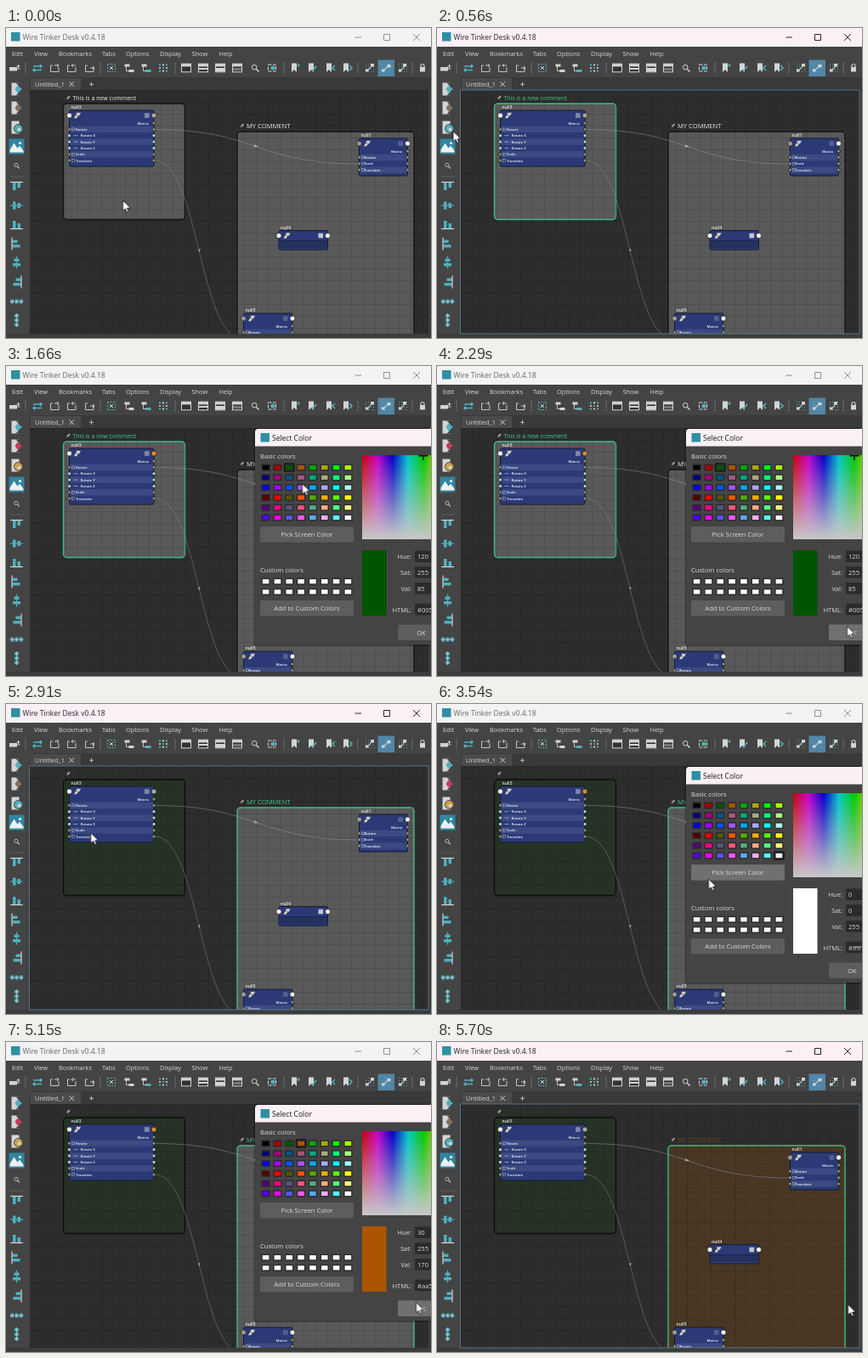
An HTML page for the animation above (6010 ms loop, 500 px wide and 365 px high).

```html
<!DOCTYPE html>
<html lang="en">
<head>
<meta charset="utf-8">
<title>Node editor</title>
<style>
html, body { margin: 0; width: 100%; height: 100%; overflow: hidden; background: #383838; }
svg { display: block; width: 500px; height: 365px; }
text { font: 7.4px "Open Sans", "Noto Sans", sans-serif; fill: #d8d8d8; white-space: pre; }
.cap { font-size: 8.5px; }
.dlg text { font-size: 7.6px; fill: #dcdcdc; }
.dlg .cap { font-size: 8.5px; fill: #1a1a1a; }
.node text { font-size: 4.3px; font-weight: 600; fill: #f0f2fa; }
.node .name { font-size: 5px; fill: #ececec; }

/* Loop: 6010 ms */
.dlg, .green, .orange, .plain, .okHover, .pickHover, .cap.win, .bar, .ctl, .c1, .c2, .t1, .t2, .warm, .red, .gold, .focus {
  animation: 6010ms step-end infinite;
}
.cap.win { animation-name: caption; }
.bar { animation-name: bar; }
.ctl { animation-name: controls; }
.dlg, .focus { visibility: hidden; }
.dlg { animation-name: dlg; }
.focus { animation-name: focus; }
.plain { animation-name: plain; }
.green { animation-name: green; }
.orange { animation-name: orange; }
.okHover { animation-name: okHover; }
.pickHover { animation-name: pickHover; }
.c1 { animation-name: c1; }
.c2 { animation-name: c2; }
.t1 { animation-name: t1; }
.t2 { animation-name: t2; }
.warm { --hot: #e08a28; animation-name: warm; }
.red { --hot: #c93a5a; --cold: #85705f; animation-name: warm; }
.gold { --hot: #cfa04c; --cold: #4fb0c0; animation-name: warm; }
.cursor { animation: move 6010ms linear infinite; }

@keyframes dlg { 0%, 39.43%, 90.52% { visibility: hidden } 15.14%, 55.57% { visibility: visible } }
@keyframes focus { 0%, 15.14%, 55.57% { visibility: hidden } 2.33%, 39.43%, 90.52% { visibility: visible } }
@keyframes plain { 0%, 39.43%, 90.52% { visibility: hidden } 15.14%, 55.57% { visibility: visible } 24.13%, 77.54% { visibility: hidden } }
@keyframes green { 0%, 39.43% { visibility: hidden } 24.13% { visibility: visible } }
@keyframes orange { 0%, 90.52% { visibility: hidden } 77.54% { visibility: visible } }
@keyframes okHover { 0%, 39.43%, 90.52% { visibility: hidden } 34.6%, 83.5% { visibility: visible } }
@keyframes pickHover { 0%, 63.4% { visibility: hidden } 57.8% { visibility: visible } }
@keyframes caption { 0%, 15.14%, 55.57% { fill: #666 } 2.33%, 39.43%, 90.52% { fill: #222 } }
@keyframes bar { 0%, 15.14%, 55.57% { fill: #f3f3f3 } 2.33%, 39.43%, 90.52% { fill: #fcf0f7 } }
@keyframes controls { 0%, 15.14%, 55.57% { stroke: #858585 } 2.33%, 39.43%, 90.52% { stroke: #111 } }
@keyframes c1 {
  0% { fill: #595959; stroke: #141414 } 2.33% { fill: #595959; stroke: #3dbd87 }
  39.43% { fill: #263324; stroke: #3dbd87 } 42.6% { fill: #263324; stroke: #0c100c }
}
@keyframes c2 {
  0% { fill: #595959; stroke: #141414 } 42.6% { fill: #595959; stroke: #3dbd87 }
  90.52% { fill: #493723; stroke: #3dbd87 }
}
@keyframes t1 { 0% { fill: #f0f0f0 } 2.33% { fill: #3fcb8e } 39.43% { fill: #1d401d } }
@keyframes t2 { 0% { fill: #f0f0f0 } 42.6% { fill: #3fcb8e } 90.52% { fill: #6e481c } }
@keyframes warm { 0%, 39.43%, 90.52% { fill: var(--cold, #a8a8a8) } 15.14%, 55.57% { fill: var(--hot) } }
@keyframes move {
  0%, 2.33% { transform: translate(137.5px, 203px); animation-timing-function: ease-in-out }
  10.5%, 15.14% { transform: translate(14px, 118px); animation-timing-function: ease-out }
  17.3% { transform: translate(306.5px, 135px); animation-timing-function: ease-in-out }
  22.5%, 25.3% { transform: translate(333px, 119px); animation-timing-function: ease-in-out }
  35.7%, 39.43% { transform: translate(482.5px, 306.5px); animation-timing-function: ease-in-out }
  41.9%, 43.3% { transform: translate(440px, 285px); animation-timing-function: ease-in-out }
  50.75%, 55.57% { transform: translate(14px, 118px); animation-timing-function: ease-out }
  58.9%, 62.2% { transform: translate(319.5px, 206px); animation-timing-function: ease-in-out }
  72.88% { transform: translate(360.5px, 119px); animation-timing-function: ease-in-out }
  76%, 77.54% { transform: translate(347px, 119px); animation-timing-function: ease-in-out }
  84.5%, 90.52% { transform: translate(482.5px, 306.5px); animation-timing-function: ease-out }
  94.84%, 100% { transform: translate(483.5px, 309px) }
}
</style>
</head>
<body>
<svg id="stage" viewBox="0 0 500 365" xmlns="http://www.w3.org/2000/svg"></svg>
<script>
const TEAL = '#4fb0c0', PALE = '#d4d4d4', DARK = '#333';

const rect = (x, y, w, h, fill, more = '') =>
  `<rect x="${x}" y="${y}" width="${w}" height="${h}" fill="${fill}" ${more}/>`;
const line = (d, color, w = 1, more = '') =>
  `<path d="${d}" fill="none" stroke="${color}" stroke-width="${w}" ${more}/>`;
const shape = (d, fill, more = '') => `<path d="${d}" fill="${fill}" ${more}/>`;
const dot = (x, y, r, fill, more = '') => `<circle cx="${x}" cy="${y}" r="${r}" fill="${fill}" ${more}/>`;
const text = (x, y, s, more = '') => `<text x="${x}" y="${y}" ${more}>${s}</text>`;
const group = (cls, ...parts) => `<g class="${cls}">${parts.join('')}</g>`;
const at = (x, y, ...parts) => `<g transform="translate(${x} ${y})">${parts.join('')}</g>`;
const turn = (deg, s) => `<g transform="rotate(${deg})">${s}</g>`;
const times = (n, f) => Array.from({ length: n }, (_, i) => f(i)).join('');

// Icons, each centred on 0,0
const lens = line('M1.5 1.5L4.5 4.5', PALE, 1.5) + dot(-.8, -.8, 2.8, 'none', `stroke="${PALE}"`);
const tray = arrow => line('M-2 -3H-4.5V4.5H5V-1', PALE, .9) + line(arrow, PALE, .9);
const tree = color => rect(-5.5, -4.5, 6, 3, PALE) + rect(-.5, 2, 6, 3, color) + line('M-3.5 -2V3.5H0', PALE, .9);
const card = (h, tone) => rect(-5.5, -4.8, 11, 9.6, DARK, `stroke="${PALE}"`) +
  rect(-5.5, -4.8, 11, 3.2, PALE) + rect(-5, 0, 10, h, tone);
const mark = extra => shape('M-4 -5.5H2V5L-1 2L-4 5Z', PALE) + extra;
const snap = (x, y) => times(16, i => dot(i % 4 * 3 - 4.5, (i >> 2) * 3 - 4.5, .6, TEAL)) +
  line('M-3.5 3C0 3 0 -2.5 3.5 -2.5', PALE, 1.1) + rect(-5, 1.5, 3.4, 3, PALE) + rect(x, y, 4, 3.4, PALE);
const lock = rect(-3, -1, 6, 5.5, PALE, 'rx=".6"') + line('M-2 -1V-2.5A2 2 0 0 1 2 -2.5V-1', PALE, 1.2);
const tag = (fill, cls) => rect(-6, -7.5, 9, 15, PALE) + shape('M-1 -7.5L6 0L-1 7.5H4V-7.5Z', '#444') +
  shape('M1 -4.5L6.5 0L1 4.5L-2 0Z', fill, `class="${cls}"`);

function toolbar() {
  const icons = [
    [10, rect(-6, -1, 9, 4.5, PALE) + line('M3 1H6.5M4.5 -4V0M2.5 -2H6.5', PALE)],
    [37, line('M-5 -2H5M3 -4L5 -2L3 0M5 2.5H-5M-3 .5L-5 2.5L-3 4.5', TEAL, 1.6)],
    [57, tray('M0 -3H5M3 -5L5 -3L3 -1')], [77, tray('M5 -3H0M2 -5L0 -3L2 -1')], [98, tray('M1 0H6M4 -2L6 0L4 2')],
    [124, rect(-4.5, -4.5, 9, 9, 'none', `stroke="${TEAL}" stroke-dasharray="2 1.4"`) + line('M-2 2L2 -2M-2 -2L2 2', PALE)],
    [145, tree(PALE)], [165, tree(TEAL)],
    [185, times(9, i => dot(i % 3 * 4 - 4, (i / 3 | 0) * 3.6 - 3.6, 1.1, i % 2 ? PALE : TEAL))],
    [212, card(0, PALE)], [232, card(2, PALE)], [252, card(4.4, PALE)], [272, card(3, '#777')], [293, lens],
    [313, rect(-4.5, -4, 9, 8, 'none', `stroke="${PALE}" stroke-dasharray="4 1.5"`) + dot(1, 0, 2.6, TEAL)],
    [340, mark(line('M2 -3H6M4 -5V-1', TEAL, 1.2))], [360, mark(line('M0 4L5 -2', TEAL, 1.8))],
    [381, mark(line('M6 -3L3 0L6 3', TEAL, 1.6))], [401, mark(line('M3 -3L6 0L3 3', TEAL, 1.6))],
    [428, snap(1, -5)], [447, snap(1.5, -4)], [467, snap(0, -5)], [490, lock],
  ];
  return rect(437.5, 37.5, 19.5, 19.5, '#5285a6') +
    icons.map(([x, icon]) => at(x, 47, icon)).join('') +
    [23, 111, 199, 327, 414, 478].map(x => line(`M${x} 41V54`, '#858585', 1, 'stroke-dasharray="1.5 1"')).join('');
}

// Two bars against a guide line; side -1, 0 or 1
const bars = (side, h) => side * -.5 * (10 - h) - h / 2;
const align = (side, deg) => turn(deg, rect(-4.5, bars(-side, 9), 3.5, 9, TEAL) +
  rect(1, bars(-side, 6), 3.5, 6, TEAL) + rect(-7.5, side * 5.5 - .6, 15, 1.2, side ? PALE : TEAL));

function sidebar() {
  const spread = rect(-7, -2.5, 3.5, 5, TEAL) + rect(-1.7, -2.5, 3.5, 5, TEAL) + rect(3.6, -2.5, 3.5, 5, TEAL) +
    line('M-8 0H8', PALE, .8);
  const icons = [
    [72, tag(TEAL, '')], [94, tag('#85705f', 'red')],
    [117, rect(-6, -7.5, 9, 15, PALE) + dot(2, 1.5, 5, TEAL, 'class="gold" stroke="#444"') + dot(3, 2.5, 2, PALE)],
    [139.5, rect(-9, -9, 18, 18, '#2f86a0') + shape('M-8 7V4L-3 -4L1 2L3.5 -1L8 5V7Z', '#f0f0f0') +
      dot(4, -4, 1.6, '#f0f0f0')],
    [162, `<g transform="scale(.75)">${lens}</g>`],
    [187, align(-1, 0)], [209, align(0, 0)], [231, align(1, 0)],
    [254, align(-1, -90)], [276, align(0, -90)], [299, align(1, -90)],
    [322, spread], [344, turn(90, spread)],
  ];
  return icons.map(([y, icon]) => at(12.5, y, icon)).join('') + line('M5 175H21', '#5c5c5c');
}

function node(name, x, y, w, h, rows) {
  const hy = y + 6, step = 7.35, big = w > 80, small = !rows.length;
  const ring = 'stroke="#1a1a1a" stroke-width=".7"';
  let s = rect(x, y, w, h, '#2b3a76', 'rx="1.5" stroke="#141a30" stroke-width="1"') +
    text(x + 2, y - 2, name, 'class="name"');
  if (small) s += rect(x + .6, y + 12, w - 1.2, h - 14, '#25315f') + line(`M${x} ${y + 12}h${w}`, '#182044', .8);
  rows.forEach((label, i) => {
    const cy = y + 15 + i * step, sub = label.length === 1;
    const tone = sub ? '#a9dce4' : '#85907f';
    if (i % 2) s += rect(x + 1, cy - step / 2, w - 2, step, '#3b4a82');
    if (i) {
      const tx = x + (sub ? 13 : big ? 7.5 : 6);
      s += text(tx, cy + 1.6, sub ? `Rotate ${label}` : label) + dot(x, cy, 2, tone, ring);
      s += sub ? line(`M${x + 5} ${cy}h5`, '#c0c6dc', .7)
        : rect(x + 3, cy - 1.4, 2.8, 2.8, 'none', 'stroke="#c0c6dc" stroke-width=".5"');
    } else s += text(x + w - 6, cy + 1.6, label, 'text-anchor="end"');
    s += dot(x + w, cy, 2, tone, ring);
  });
  s += at(x + 9.5, hy, shape('M-4 3.2L-2 -.6L1 .2L-1 3.2ZM-1 -3.2H4L2 .6L-1.4 -1Z', '#d8d0bc')) +
    rect(x + w - 11, hy - 2.8, 5.6, 5.6, small ? '#c2c6d2' : big ? '#8088a8' : '#56608c') +
    dot(x, hy, 3, big || small ? '#fff' : '#9c9c9c', ring) +
    dot(x + w, hy, 3, big ? '#a8a8a8' : '#fff', `${ring} class="${big ? 'warm' : ''}"`);
  return group('node', s);
}

const pin = (x, y) => at(x, y, shape('M-2.5 2.8L-1 .7L-2 -.3L0 -.6L1 -2.6L2.7 -.9L.8 .2L.5 2L-.5 1.1Z', '#b9b9b9'));
const comment = (n, x, y, w, h, label, size) =>
  rect(x, y, w, h, '#595959', `class="c${n}" rx="4" stroke-width="1.4"`) + pin(x + 5.5, y - 7) +
  text(x + 11, y - 4.4, label, `class="t${n}" style="font-size:${size}px"`);

function canvas() {
  const wire = (d, c) => line(d, c, .6, 'opacity=".8"');
  return rect(28, 73, 469, 287, '#2d2d2d') + '<g clip-path="url(#view)">' +
    comment(1, 67.5, 89, 143, 136.5, 'This is a new comment', 7) +
    comment(2, 272, 122, 208, 250, 'MY COMMENT', 7.6) +
    rect(28, 73, 469, 287, 'url(#grid)') +
    wire('M175 119.5C295 119.5 295 160 415 160', '#9797b0') + wire('M175 156C227 156 227 367 279 367', '#8c8c8c') +
    shape('M297 140.2L291.5 140.3L292.6 137Z', '#a8a8b4') + shape('M227.7 264L225.6 260.8L228.6 260.3Z', '#999') +
    node('null3', 74.5, 97, 99.5, 66, ['Matrix', 'Rotate', 'X', 'Y', 'Z', 'Scale', 'Translate']) +
    node('null1', 415.5, 130, 57, 44, ['Matrix', 'Rotate', 'Scale', 'Translate']) +
    node('null4', 321, 238.5, 57.5, 22.5, []) +
    node('null5', 279.5, 336, 57.5, 44, ['Matrix', 'Rotate', 'Scale', 'Translate']) + '</g>' +
    rect(27.5, 73, 469.5, 287, 'none', 'stroke="#557a90" stroke-width=".9" class="focus"');
}

const swatchX = c => 305.6 + c * 13.83, swatchY = r => 119.5 + r * 11.8;
const swatch = (x, y, fill) => rect(x - 5.2, y - 4, 10.4, 8, '#2a2a2a', 'rx="1"') + rect(x - 3.8, y - 2.6, 7.6, 5.2, fill);
const button = (x, y, w, label, tx, hover) => rect(x, y, w, 18.5, '#5d5d5d', 'rx="1.5"') +
  (hover && rect(x, y, w, 18.5, '#707070', `rx="1.5" class="${hover}" visibility="hidden"`)) +
  text(tx, y + 12, label, 'text-anchor="middle"');

function picked(cls, hex, hsv, col, row, cross = '') {
  return group(cls, rect(swatchX(col) - 5.8, swatchY(row) - 4.6, 11.6, 9.2, 'none', 'rx="1" stroke="#101010" stroke-width="1.2"'),
    rect(419, 217, 28.5, 77, hex), hsv.map((v, i) => text(484, 227.3 + i * 18.8, v)).join(''),
    text(484, 289.5, hex), cross);
}

function dialog() {
  const basic = times(48, i => {
    const c = i % 8, r = i / 8 | 0;
    const rgb = [(2 * (c & 1) + (r > 2)) * 85, (c >> 1) * 85, r % 3 * 127.5 | 0];
    return swatch(swatchX(c), swatchY(r), `rgb(${rgb})`);
  });
  const custom = times(16, i => swatch(swatchX(i % 8), 253.7 + (i / 8 | 0) * 12.2, '#fff'));
  const labels = ['Hue:', 'Sat:', 'Val:', 'HTML:'];
  return group('dlg',
    rect(291.5, 73, 209, 257, '#000', 'opacity=".3" rx="4"'),
    shape('M293 328V78Q293 74 297 74H500V328Z', '#444'),
    shape('M293 94.5V78Q293 74 297 74H500V94.5Z', '#fbf0f3'),
    rect(299.5, 79, 10.5, 10.5, '#2f8fa3'), text(313, 88, 'Select Color', 'class="cap"'),
    text(299, 108.7, 'Basic colors'), basic, button(299, 189, 110, 'Pick Screen Color', 354, 'pickHover'),
    text(299, 243.4, 'Custom colors'), custom, button(299, 276, 110, 'Add to Custom Colors', 354, ''),
    rect(419, 105, 108, 99, 'url(#hue)'), rect(419, 105, 108, 99, 'url(#fade)'),
    labels.map((s, i) => {
      const y = i < 3 ? 217.5 + i * 18.8 : 279.7;
      return text(477, y + 9.8, s, 'text-anchor="end"') + rect(481, y, 30, 13.5, '#2b2b2b', 'rx="1"');
    }).join(''),
    picked('plain', '#ffffff', [0, 0, 255], 7, 5),
    picked('green', '#005500', [120, 255, 85], 2, 0, line('M491 105V111M485.5 105.8H496.5', '#111', 1.6)),
    picked('orange', '#aa5500', [30, 255, 170], 3, 0),
    button(461, 304.5, 55, 'OK', 488.5, 'okHover'));
}

function defs() {
  const hues = times(7, i => `<stop offset="${i / 6}" stop-color="hsl(${360 - i * 60} 100% 39.2%)"/>`);
  return `<defs><clipPath id="view"><rect x="28" y="73" width="469" height="287"/></clipPath>
    <pattern id="grid" x="28" y="73" width="14" height="14" patternUnits="userSpaceOnUse">
      <path d="M0 .5H14M.5 0V14" stroke="#000" stroke-opacity=".11"/></pattern>
    <linearGradient id="hue">${hues}</linearGradient>
    <linearGradient id="fade" x2="0" y2="1"><stop stop-color="#c8c8c8" stop-opacity="0"/>
      <stop offset="1" stop-color="#c8c8c8"/></linearGradient></defs>`;
}

function chrome() {
  const menus = [[7, 'Edit'], [33, 'View'], [62, 'Bookmarks'], [113, 'Tabs'], [141, 'Options'],
    [181, 'Display'], [218.5, 'Show'], [250.5, 'Help']];
  return rect(0, 0, 500, 365, '#444') + rect(0, 0, 500, 22, '#f3f3f3', 'class="bar"') +
    rect(6, 5, 10.5, 10.5, '#2f8fa3') + text(19.5, 13.6, 'Wire Tinker Desk v0.4.18', 'class="cap win"') +
    line('M410.5 11H418M444.5 7.5H451.5V14.5H444.5ZM479 7L487 15M487 7L479 15', '#858585', .9, 'class="ctl"') +
    menus.map(([x, s]) => text(x, 32.5, s)).join('') + toolbar() +
    rect(28, 58, 472, 15, '#393939') + rect(29, 59, 59, 14, '#4a4a4a') + text(34, 68.6, 'Untitled_1') +
    line('M74.5 63.5L80 69M80 63.5L74.5 69', '#d0d0d0') + line('M98 66.3H103M100.5 63.8V68.8', '#c4c4c4', .9) +
    sidebar() + rect(497, 73, 3, 292, '#3c3c3c') + rect(0, 360, 500, 5, '#3c3c3c');
}

const cursor = group('cursor', shape('M0 0V12.4L2.9 9.7L4.9 14L6.8 13.1L5 9H8.9Z', '#fff',
  'stroke="#111" stroke-width=".8"'));

document.getElementById('stage').innerHTML = defs() + chrome() + canvas() + dialog() + cursor;
</script>
</body>
</html>
```
